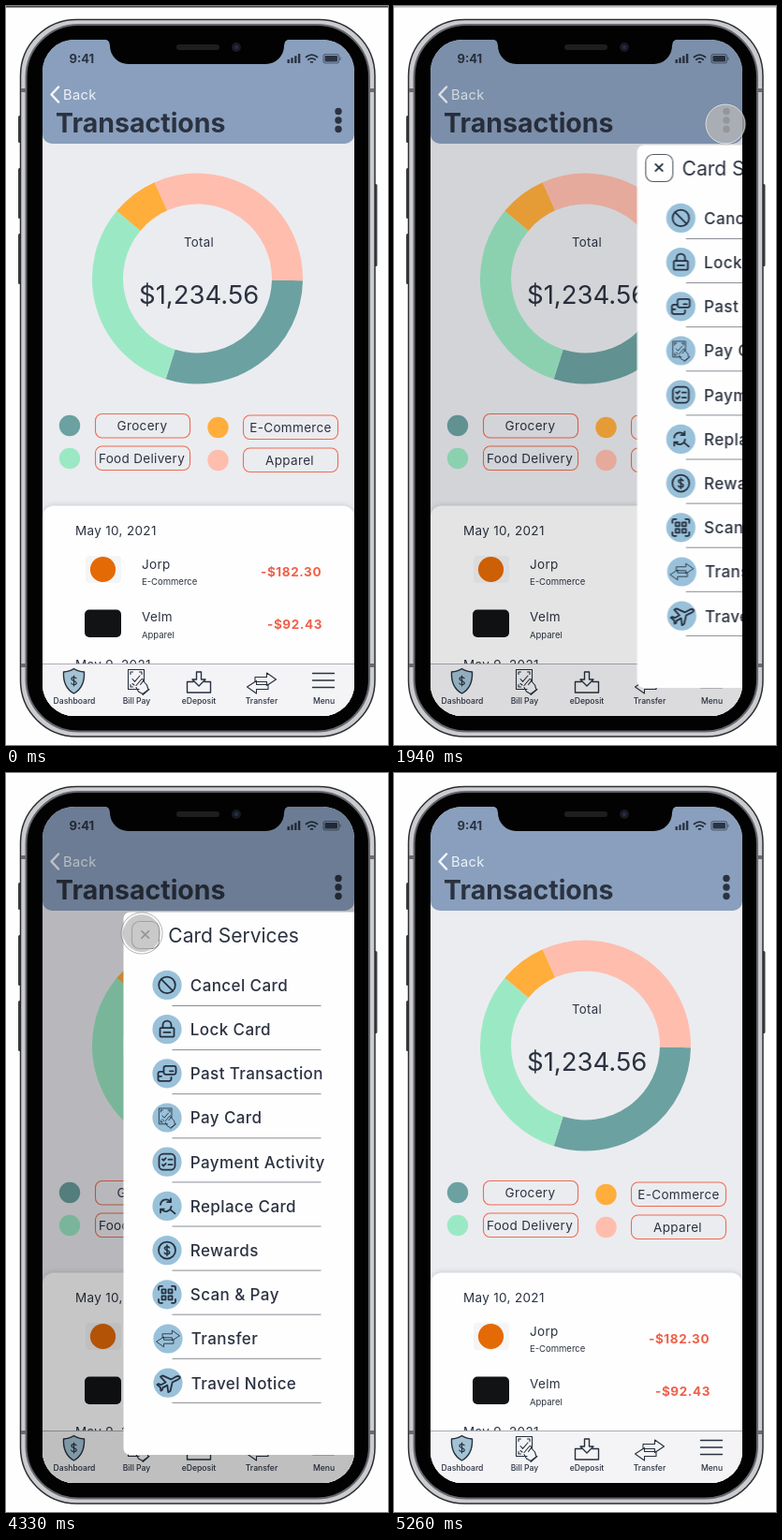
An HTML page that plays this animation: 408x789 px, repeating every 6.19 s.

```html
<!DOCTYPE html>
<html lang="en">
<head>
<meta charset="utf-8">
<title>Card services menu</title>
<style>
  html, body { margin: 0; width: 100%; height: 100%; overflow: hidden; background: #fefefe; }
  svg { display: block; width: 100%; height: 100%; }
  text { font-family: Inter, Roboto, sans-serif; font-optical-sizing: none; fill: #2b3240; }
  .mid { text-anchor: middle; }
  .body { font-size: 13.5px; letter-spacing: .33px; }
  .small { font-size: 9.5px; }
  .amount { font-size: 13.5px; font-weight: 700; letter-spacing: .6px; fill: #f0604a; }
  .tab { font-size: 8.6px; font-weight: 500; text-anchor: middle; }
  .item { font-size: 17px; font-weight: 500; letter-spacing: .4px; }
  .line { fill: none; stroke: #27303f; stroke-width: 1.4; stroke-linecap: round; stroke-linejoin: round; }
  .thin { stroke-width: 1.1; }
  .bold { stroke-width: 1.8; }
  .box { fill: none; stroke: #f06a50; stroke-width: 1.1; }
  .ring { fill: none; stroke-width: 33; }

  .panel, .dim, .edge, .cursor, .core, .halo { animation: 6190ms linear infinite; }
  .panel { animation-name: slide; }
  .dim { animation-name: dim; }
  .edge { animation-name: edge; }
  .cursor { animation-name: travel; }
  .core { animation-name: press; }
  .halo { animation-name: halo; }

  @keyframes slide {
    0% { transform: translateX(250px); }
    29.84% { transform: translateX(250px); animation-timing-function: ease-out; }
    34.68% { transform: none; }
    76.12% { transform: none; animation-timing-function: ease-out; }
    80.97%, 100% { transform: translateX(250px); }
  }
  @keyframes dim {
    0% { opacity: 0; }
    29.84% { opacity: 0; animation-timing-function: ease-out; }
    34.68% { opacity: .22; }
    76.12% { opacity: .22; animation-timing-function: ease-out; }
    80.97%, 100% { opacity: 0; }
  }
  @keyframes edge {
    0%, 29.84% { opacity: 1; }
    32.2%, 100% { opacity: 0; }
  }
  @keyframes travel {
    0%, 14.69% { opacity: 0; transform: translate(408px, 117px); }
    14.7% { opacity: 1; transform: translate(408px, 117px); animation-timing-function: cubic-bezier(.3, .4, .65, .92); }
    25.2%, 55.23% { opacity: 1; transform: translate(354px, 126px); }
    55.24% { opacity: 1; transform: translate(299px, 145px); animation-timing-function: cubic-bezier(.3, .4, .65, .92); }
    66.24%, 80.5% { opacity: 1; transform: translate(145px, 171px); }
    84.8%, 100% { opacity: 0; transform: translate(145px, 171px); }
  }
  @keyframes press {
    0%, 24.6% { transform: none; }
    25.2%, 27% { transform: scale(.95); }
    27.6%, 68.2% { transform: none; }
    69.9%, 74.6% { transform: scale(.95); }
    75.1%, 100% { transform: none; }
  }
  @keyframes halo {
    0%, 24.6% { opacity: .45; }
    25.2%, 27% { opacity: 1; }
    27.6%, 68.2% { opacity: .45; }
    69.9%, 74.6% { opacity: 1; }
    75.1%, 100% { opacity: .45; }
  }
</style>
</head>
<body>
<svg viewBox="0 0 408 789" preserveAspectRatio="none">
  <defs>
    <clipPath id="screen"><rect x="39" y="36" width="333" height="722" rx="34"/></clipPath>
    <filter id="soft" x="-10%" y="-10%" width="120%" height="120%"><feGaussianBlur stdDeviation="2.5"/></filter>

    <path id="arrow" d="M-7-6.5H5.500V-11L15.500-4 5.500 2.500V-1.500H-7z"/>
    <g id="transfer"><use href="#arrow"/><use href="#arrow" transform="rotate(180)"/></g>
    <g id="bill">
      <path d="M2 8.500H-9.500v-21H7.500V0M-7-10h2.500M-7-10v2.500M5-10H2.500M5-10v2.500M-7 6h2.500M-7 6V3.500"/>
      <path d="M-5-2.500l2.500 2.800L3-6M-5 2.500l2 1.500"/>
      <path d="M-1 4.500 4.500-2c1.400-1.200 2.800.3 2 1.700L3.500 3.500M6.500-.5 10.500 4l1.500 5-6 4.500L1.500 11-1 6.500M13 8.500 6 14.500"/>
    </g>
    <path id="dollar" d="M3-3.200C2-5.300-3-5.200-3-2.500-3 .4 3.200-.4 3.200 2.500 3.200 5.300-2.200 5.400-3.200 3.100M0-6.500v13"/>
    <g id="cancel"><circle r="8.800"/><path d="M-6.200-6.200 6.200 6.200"/></g>
    <g id="lock"><rect x="-7.500" y="-1.500" width="15" height="9.500" rx="1"/><path d="M-4.500-1.500v-3a4.500 4.500 0 0 1 9 0v3M-3.500 3.300h7"/></g>
    <g id="past"><rect x="-3.500" y="-8" width="13" height="9" rx="2"/><path d="M3-2.500h3.500M-6-2H-7.500a2 2 0 0 0-2 2V6a2 2 0 0 0 2 2H2.500a2 2 0 0 0 2-2V4M-9 3h3M-6.500-2H-4"/></g>
    <g id="check"><rect x="-8.500" y="-8.500" width="17" height="17" rx="4.500"/><path d="M-5-2.800l1.300 1.300 2.400-2.600M-5 3l1.300 1.300 2.400-2.600M1.500-2.500h4M1.500 3h4"/></g>
    <path id="replace" d="M-7-1.500A6 6 0 0 1 3.800-4.500M4-8v3.800H.2M4.500.5A6 6 0 0 1-6 3.500M-7 7V3.200H-3.200M3.200 3.500 8.500 8"/>
    <g id="reward"><circle r="9"/><use href="#dollar" transform="scale(.85)"/></g>
    <path id="scan" d="M-9-5v-2.500A1.500 1.500 0 0 1-7.500-9H-5M5-9h2.500A1.500 1.500 0 0 1 9-7.500V-5M9 5v2.500A1.500 1.500 0 0 1 7.500 9H5M-5 9h-2.500A1.500 1.500 0 0 1-9 7.500V5M-5.500-5.500h4v4h-4zM1.500-5.500h4v4h-4zM-5.500 1.500h4v4h-4zM1.500 1.500h4v4h-4z"/>
    <g id="swap"><use href="#transfer" transform="scale(.8)"/></g>
    <g id="pay"><use href="#bill" transform="translate(-1) scale(.8)"/></g>
    <path id="plane" transform="rotate(16)" d="M10.500-9.500c-1.700-1-3.500 0-4.500 1L2-4.500-7.500-6l-2 1.800L-2.500 0l-4 4-3-.3-1.200 1.200 4 1.700 1.700 3.500 1.200-1.200L-4 6.500l4-4L3 9.500l1.800-2L4.300-2l4.500-4c1-1 2.700-2.200 1.700-3.500z"/>
  </defs>

  <rect width="408" height="789" fill="#fefefe"/>
  <rect class="edge" width="408" height="1.600" fill="#484848"/>

  <!-- phone body -->
  <g fill="#3b3c40">
    <rect x="13" y="117" width="4" height="29" rx="1.500"/>
    <rect x="13" y="173" width="4" height="54" rx="1.500"/>
    <rect x="13" y="243" width="4" height="54" rx="1.500"/>
    <rect x="392" y="190" width="4.500" height="88" rx="1.500"/>
  </g>
  <rect x="15.500" y="14.500" width="378.500" height="765.500" rx="60" fill="#cbccd0" stroke="#2d2e31" stroke-width="1.500"/>
  <path d="M16 90h5M388 90h5M16 704h5M388 704h5" stroke="#6a6b70" stroke-width="4"/>
  <rect x="21.500" y="20" width="366.500" height="754.500" rx="56" fill="#020203" stroke="#66676c" stroke-width="2"/>

  <g clip-path="url(#screen)">
    <rect x="39" y="36" width="333" height="722" fill="#ebecf0"/>
    <rect x="39" y="20" width="333" height="127" rx="10" fill="#899fbd"/>

    <text x="67.500" y="60.500" font-size="13" font-weight="700">9:41</text>
    <g fill="#2b3445">
      <path d="M300.500 57h2.400v4h-2.400zM304.300 55.300h2.400V61h-2.400zM308.100 53.200h2.400V61h-2.400zM311.900 51h2.400v10h-2.400z"/>
      <rect x="340.500" y="53" width="13.500" height="6.500" rx="1.200"/>
    </g>
    <path class="line bold" d="M320.500 54.500q6-4.800 12 0M322.800 57.200q3.700-2.800 7.400 0M325.600 59.800h1.800"/>
    <g class="line thin" opacity=".6">
      <rect x="339" y="51.500" width="16.500" height="9.500" rx="2.500"/>
      <path d="M357 55v2.500"/>
    </g>
    <path d="M56 86.500 48.500 94.500l7.500 8" fill="none" stroke="#f4f7fb" stroke-width="2.500" stroke-linecap="round" stroke-linejoin="round"/>
    <text x="61" y="100" font-size="14.700" letter-spacing=".3" style="fill:#edf2f8">Back</text>
    <text x="53" y="135" font-size="28.500" font-weight="700">Transactions</text>
    <g fill="#2b3240"><circle cx="355" cy="112.500" r="3.700"/><circle cx="355" cy="122" r="3.700"/><circle cx="355" cy="131.500" r="3.700"/></g>

    <g class="ring" id="ring" transform="translate(204.500 291)"></g>
    <text class="mid" x="206" y="256.500" font-size="13.200" letter-spacing=".3">Total</text>
    <text x="142" y="318" font-size="27.500">$1,234.56</text>

    <circle cx="68" cy="448" r="11.200" fill="#6ca1a1"/>
    <circle cx="68" cy="483" r="11.200" fill="#9be9c4"/>
    <circle cx="226.500" cy="450" r="11.200" fill="#ffae3c"/>
    <circle cx="226.500" cy="485" r="11.200" fill="#ffbdae"/>
    <g class="box">
      <rect x="95.500" y="435.500" width="101" height="25.500" rx="7"/>
      <rect x="95.500" y="470" width="101" height="25.500" rx="7"/>
      <rect x="253.500" y="437" width="101" height="25.500" rx="7"/>
      <rect x="253.500" y="472" width="101" height="25.500" rx="7"/>
    </g>
    <g class="body mid">
      <text x="145.500" y="453">Grocery</text>
      <text x="145" y="487.500">Food Delivery</text>
      <text x="304" y="455">E-Commerce</text>
      <text x="303" y="490">Apparel</text>
    </g>

    <rect x="39" y="532.500" width="333" height="240" rx="12" fill="#9a9da6" opacity=".4" filter="url(#soft)"/>
    <rect x="39" y="533.500" width="333" height="240" rx="12" fill="#fefefe"/>
    <rect x="85" y="587" width="38" height="29" rx="4" fill="#f5f5f6"/>
    <circle cx="103.500" cy="601.500" r="13.600" fill="#e46a06"/>
    <rect x="84" y="644.500" width="39" height="29.500" rx="5" fill="#121315"/>
    <g class="body">
      <text x="74" y="565">May 10, 2021</text>
      <text x="145" y="600.500">Jorp</text>
      <text x="145" y="657">Velm</text>
      <text x="74" y="708">May 9, 2021</text>
    </g>
    <text class="small" x="145" y="618">E-Commerce</text>
    <text class="small" x="145" y="675">Apparel</text>
    <text class="amount" x="272" y="608.500">-$182.30</text>
    <text class="amount" x="279" y="665">-$92.43</text>

    <!-- tab bar -->
    <rect x="39" y="702.500" width="333" height="56" fill="#f4f4f6"/>
    <path d="M39 702.500h333" stroke="#a9acb4"/>
    <g class="line">
      <path d="M72.500 707.500c3.500 2.500 7 3.300 11 3.500.5 10-2 18-11 23-9-5-11.500-13-11-23 4-.2 7.500-1 11-3.500z" fill="#a3c2d3"/>
      <use href="#dollar" transform="translate(72.500 720.500) scale(.85)"/>
      <use class="thin" href="#bill" transform="translate(140 721)"/>
      <path d="M200 721.500h-6.500V733h25v-11.500H212M203.500 711h5v8h4.500l-7 7-7-7h4.500z"/>
      <use class="thin" href="#transfer" transform="translate(273 723)"/>
      <path d="M327.500 712.500h23M327.500 720h23M327.500 727.500h23"/>
    </g>
    <g class="tab">
      <text x="73" y="745">Dashboard</text>
      <text x="139.500" y="745">Bill Pay</text>
      <text x="206" y="745">eDeposit</text>
      <text x="273" y="745">Transfer</text>
      <text x="339.500" y="745">Menu</text>
    </g>

    <rect class="dim" x="39" y="36" width="333" height="722"/>

    <g class="panel">
      <rect x="125.500" y="148.500" width="260" height="579.500" rx="7" fill="#fefefe"/>
      <rect class="line thin" x="134.500" y="158.500" width="29" height="29" rx="8" opacity=".8"/>
      <path class="line bold" d="M145 168.800l7.400 7.400m0-7.400-7.400 7.400"/>
      <text x="173.300" y="180.500" font-size="21">Card Services</text>
      <g id="rows"></g>
    </g>
  </g>

  <!-- notch -->
  <path d="M104 35.500q7 0 7 7a19.500 19.500 0 0 0 19.500 19.500h147a19.500 19.500 0 0 0 19.500-19.500q0-7 7-7z" fill="#020203"/>
  <rect x="182" y="41" width="46" height="6" rx="3" fill="#1e1e20"/>
  <circle cx="246" cy="44" r="5" fill="#181a22"/>
  <circle cx="246" cy="44" r="2.200" fill="#252c48"/>

  <g class="cursor">
    <circle class="halo" r="22" fill="none" stroke="#777" stroke-opacity=".6"/>
    <circle class="core" r="21" fill="#b9b9b9" fill-opacity=".76"/>
    <circle r="21" fill="none" stroke="#fff" stroke-opacity=".65"/>
  </g>
</svg>
<script>
  const items = [
    ["cancel", "Cancel Card"], ["lock", "Lock Card"], ["past", "Past Transaction"],
    ["pay", "Pay Card"], ["check", "Payment Activity"], ["replace", "Replace Card"],
    ["reward", "Rewards"], ["scan", "Scan &amp; Pay"], ["swap", "Transfer"], ["plane", "Travel Notice"]
  ];
  const slices = [[1.1, 107.5, "#6ca1a1"], [107.5, 220, "#9be9c4"], [220, 246, "#ffae3c"], [246, 361.1, "#ffbdae"]];

  const fill = (id, list, draw) => document.getElementById(id).innerHTML = list.map(draw).join("");
  const onRing = deg => [Math.cos, Math.sin].map(f => 96 * f(deg * Math.PI / 180)).join(" ");

  fill("ring", slices, ([from, to, color]) =>
    `<path d="M${onRing(from)}A96 96 0 0 1 ${onRing(to)}" stroke="${color}"/>`);

  fill("rows", items, ([icon, label], i) => {
    const x = i < 8 ? 172 : 173, y = 226.4 + i * 47.2;
    const weight = /pay|swap/.test(icon) ? "thin" : "bold";
    return `<circle cx="${x}" cy="${y}" r="15.6" fill="#99c1da"/>
      <use class="line ${weight}" href="#${icon}" transform="translate(${x} ${y})"/>
      <text class="item" x="${x + 24.8}" y="${y + 6.3}">${label}</text>
      <path d="M177.5 ${248.5 + i * 47.1}h159" stroke="#888c94"/>`;
  });
</script>
</body>
</html>
```
